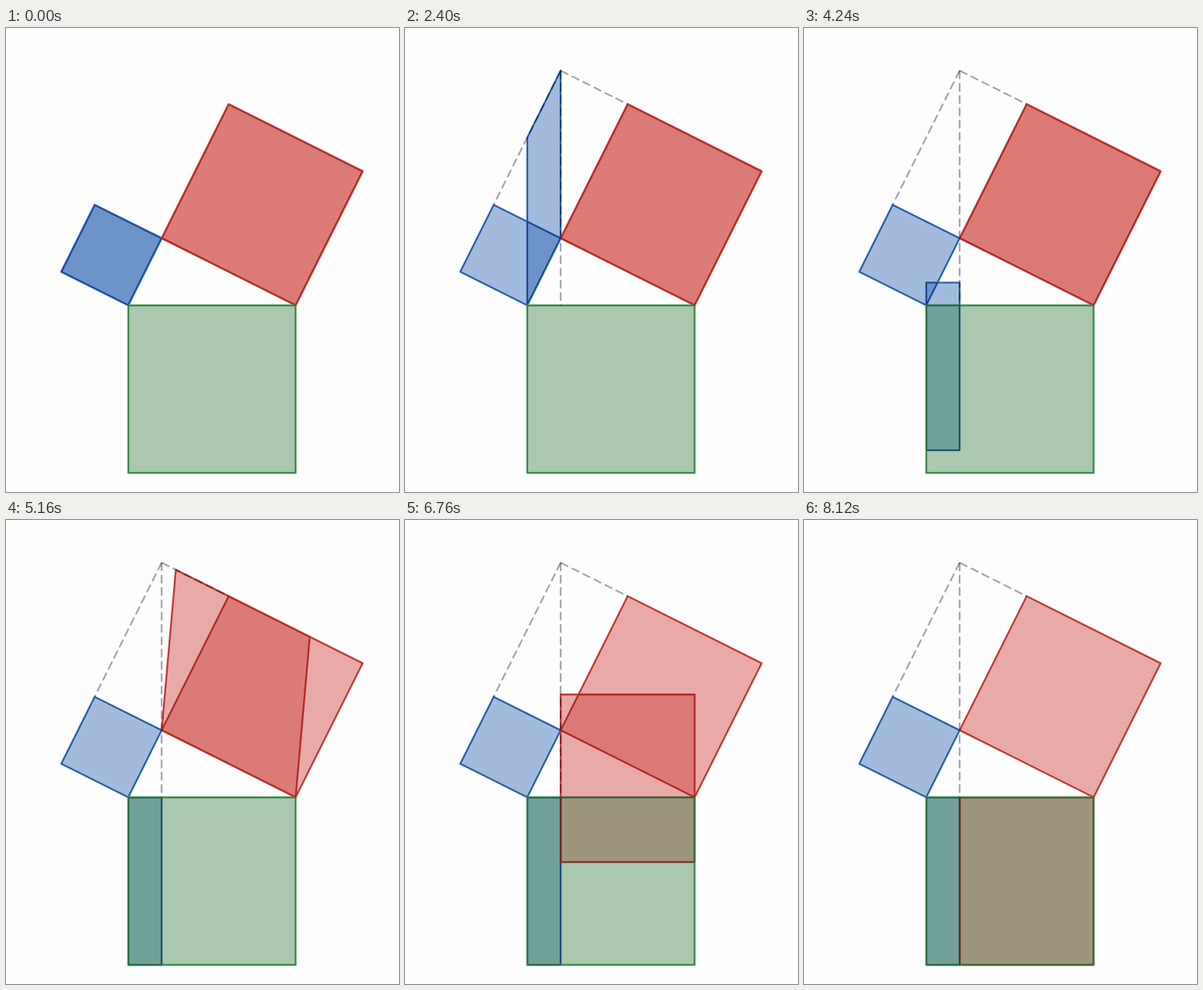
Write an HTML page that moves like this. It is 508x599 px and loops after 8.68 s.

```html
<!DOCTYPE html>
<html lang="en">
<head>
<meta charset="utf-8">
<title>Squares on a right triangle</title>
<style>
  html, body { margin: 0; width: 100%; height: 100%; overflow: hidden; background: #fdfdfd; }
  svg { display: block; width: 100%; height: 100%; background: #fdfdfd; }
  .blue { fill: #215cac; fill-opacity: .41; }
  .red { fill: #cc3c37; fill-opacity: .43; }
  .green { fill: #2b7837; fill-opacity: .4; }
  .lines { fill: none; stroke-width: 2.3; stroke-linejoin: round; mix-blend-mode: multiply; isolation: isolate; }
  .blueLine { stroke: #316fb8; }
  .redLine { stroke: #c84642; }
  .greenLine { stroke: #479a58; }
  .dash { fill: none; stroke: #a3a6b0; stroke-width: 2.2; stroke-dasharray: 11 4.9; mix-blend-mode: multiply; }
</style>
</head>
<body>
<svg id="stage" viewBox="0 0 508 599"></svg>
<script>
const LOOP = 8680, START = 1425, STEP = 993, MOVE = 960, DASH_FADE = 500;
const SIDE = 216.4;

const A = [158, 358], B = [374.4, 358], C = [201.2, 271.4];
const apex = [C[0], C[1] - SIDE];
const blueSquare = [A, C, [114.6, 228.2], [71.4, 314.8]];
const redSquare = [B, C, [287.8, 98.3], [461, 184.9]];
const greenSquare = [A, B, [B[0], B[1] + SIDE], [A[0], A[1] + SIDE]];

const stage = document.getElementById('stage');
function add(tag, className, parent = stage) {
  const node = document.createElementNS('http://www.w3.org/2000/svg', tag);
  node.setAttribute('class', className);
  return parent.appendChild(node);
}
function setPoints(node, points) {
  node.setAttribute('points', points.map(p => p.join()).join(' '));
}
function polygon(className, points, parent) {
  const node = add('polygon', className, parent);
  if (points) setPoints(node, points);
  return node;
}

polygon('blue', blueSquare);
polygon('red', redSquare);
const blueFill = polygon('blue');
const redFill = polygon('red');
polygon('green', greenSquare);

const lines = add('g', 'lines');
const blueEdge = polygon('blueLine', null, lines);
const redEdge = polygon('redLine', null, lines);
polygon('blueLine', blueSquare, lines);
polygon('redLine', redSquare, lines);
polygon('greenLine', greenSquare, lines);

const dashes = [blueSquare[2], redSquare[2], [C[0], A[1]]].map(end => {
  const node = add('polyline', 'dash');
  setPoints(node, [apex, end]);
  return node;
});

const clamp = v => Math.max(0, Math.min(1, v));
const mix = (a, b, k) => a.map((v, i) => v + (b[i] - v) * k);
const down = (p, d) => [p[0], p[1] + d];
const progress = (time, phase) => clamp((time - START - phase * STEP) / MOVE);

// Shear along the far side, shear upright, then slide into the large square.
function sheared([base, corner, far, last], time, phase) {
  const [lean, upright, slide] = [0, 1, 2].map(i => progress(time, phase + i));
  const drop = slide * SIDE;
  const inner = upright * (base[1] - corner[1]);
  return [
    down(base, drop),
    down(corner, inner + drop),
    down(mix(far, apex, lean), inner + drop),
    down(mix(last, down(base, -SIDE), lean), drop)
  ];
}

function render(time) {
  const blue = sheared(blueSquare, time, 0);
  const red = sheared(redSquare, time, 3);
  setPoints(blueFill, blue);
  setPoints(blueEdge, blue);
  setPoints(redFill, red);
  setPoints(redEdge, red);
  for (const dash of dashes) dash.setAttribute('stroke-opacity', clamp(time / DASH_FADE));
}

const begin = performance.now();
function tick() {
  render((performance.now() - begin) % LOOP);
  requestAnimationFrame(tick);
}
render(0);
requestAnimationFrame(tick);
</script>
</body>
</html>
```
